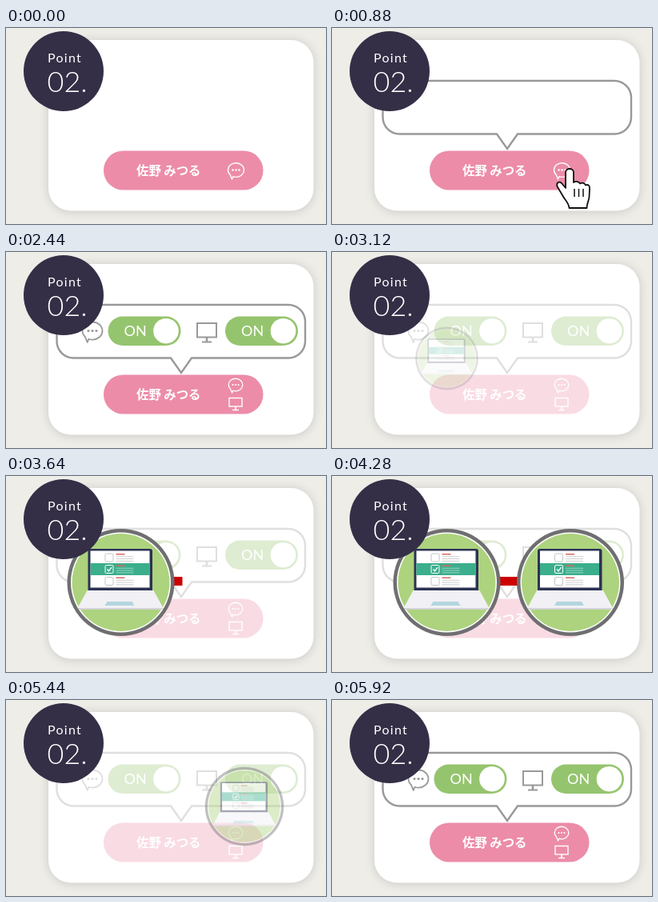
Write an HTML page with a canvas that moves like this. It is 400 px wide and 245 px high and loops after 6000 ms.

```html
<!DOCTYPE html>
<html lang="ja">
<head>
<meta charset="utf-8">
<style>
html, body { margin: 0; width: 100%; height: 100%; overflow: hidden; background: #eeede8; }
canvas { display: block; }
</style>
</head>
<body>
<canvas id="stage" width="400" height="245"></canvas>
<script>
const LOOP = 6000, STEP = 40;
const GRAY = '#999999', GREEN = '#95c46e', PINK = '#ec8ca8', NAVY = '#2c3354';
const stage = document.getElementById('stage');
const screenCtx = stage.getContext('2d');
const layer = document.createElement('canvas');
layer.width = 400;
layer.height = 245;
const layerCtx = layer.getContext('2d');
let ctx = screenCtx;

// Progress of a move whose first and last visible steps are given.
const progress = (t, first, last) =>
  Math.min(1, Math.max(0, (t - first + STEP) / (last - first + STEP)));
const mix = (a, b, p) => a + (b - a) * p;

function rect(x, y, w, h, color) {
  ctx.fillStyle = color;
  ctx.fillRect(x, y, w, h);
}

function pill(x, y, w, h, r, color) {
  ctx.beginPath();
  ctx.roundRect(x, y, w, h, r);
  ctx.fillStyle = color;
  ctx.fill();
}

function disc(x, y, r, color) {
  ctx.beginPath();
  ctx.arc(x, y, r, 0, Math.PI * 2);
  ctx.fillStyle = color;
  ctx.fill();
}

function poly(points, color) {
  ctx.beginPath();
  points.forEach(([x, y]) => ctx.lineTo(x, y));
  ctx.closePath();
  ctx.fillStyle = color;
  ctx.fill();
}

function line(points, color, width) {
  ctx.beginPath();
  points.forEach(([x, y]) => ctx.lineTo(x, y));
  ctx.strokeStyle = color;
  ctx.lineWidth = width;
  ctx.stroke();
}

function label(text, x, y, font, spacing = 0) {
  ctx.font = font;
  ctx.letterSpacing = spacing + 'px';
  ctx.fillStyle = '#fff';
  ctx.fillText(text, x, y);
}

// Draws a group as one picture, scaled about a point and faded as a whole.
function group(alpha, scale, cx, cy, draw) {
  if (alpha <= 0) return;
  layerCtx.clearRect(0, 0, 400, 245);
  layerCtx.save();
  layerCtx.translate(cx, cy);
  layerCtx.scale(scale, scale);
  layerCtx.translate(-cx, -cy);
  ctx = layerCtx;
  draw();
  layerCtx.restore();
  ctx = screenCtx;
  ctx.globalAlpha = Math.min(1, alpha);
  ctx.drawImage(layer, 0, 0);
  ctx.globalAlpha = 1;
}

function popIn(p, from, peak) {
  return p < 0.7 ? mix(from, peak, p / 0.7) : mix(peak, 1, (p - 0.7) / 0.3);
}

function popOut(p) {
  return p < 0.2 ? mix(1, 1.06, p / 0.2) : mix(1.06, 0.36, (p - 0.2) / 0.8);
}

function card() {
  rect(0, 0, 400, 245, '#eeede8');
  ctx.save();
  ctx.shadowColor = 'rgba(90, 85, 75, 0.24)';
  ctx.shadowBlur = 12;
  ctx.shadowOffsetY = 1;
  pill(53, 15, 331.5, 213.5, 28, '#fff');
  ctx.restore();
}

function badge() {
  disc(72, 54, 50, '#342f46');
  label('Point', 52, 42.5, '16px Lato, sans-serif', 1.3);
  label('02.', 51.5, 80, '300 36px Lato, sans-serif');
}

function chatIcon(x, y, s, color, width) {
  ctx.save();
  ctx.translate(x, y);
  ctx.scale(s, s);
  ctx.beginPath();
  ctx.ellipse(0, 0, 10, 8.8, 0, Math.PI * 0.76, Math.PI * 2.62);
  ctx.lineTo(-5, 11.5);
  ctx.closePath();
  ctx.strokeStyle = color;
  ctx.lineWidth = width / s;
  ctx.lineJoin = 'round';
  ctx.stroke();
  for (const dx of [-4, 0, 4]) disc(dx, 0, 1.25, color);
  ctx.restore();
}

function monitorIcon(x, y, w, h, foot, color, width) {
  ctx.strokeStyle = color;
  ctx.lineWidth = width;
  ctx.strokeRect(x - w / 2, y, w, h);
  line([[x, y + h], [x, y + h + foot]], color, width * 1.3);
  line([[x - w / 4, y + h + foot], [x + w / 4, y + h + foot]], color, width);
}

function nameButton(sharing) {
  pill(122, 153.5, 199.5, 49, 24.5, PINK);
  label('佐野 みつる', 163, 184, 'bold 15.4px "Noto Sans CJK JP", "Noto Sans CJK", sans-serif');
  if (sharing) {
    chatIcon(287, 166, 0.88, '#fff', 1.3);
    monitorIcon(287, 182.5, 16, 10.5, 4.5, '#fff', 1.4);
  } else {
    chatIcon(287.5, 177.5, 1, '#fff', 1.4);
  }
}

function bubble() {
  ctx.beginPath();
  ctx.moveTo(206, 132.5);
  ctx.lineTo(84, 132.5);
  ctx.arcTo(63.5, 132.5, 63.5, 112, 21);
  ctx.arcTo(63.5, 66, 84, 66, 21);
  ctx.arcTo(374, 66, 374, 87, 21);
  ctx.arcTo(374, 132.5, 353, 132.5, 21);
  ctx.lineTo(232, 132.5);
  ctx.lineTo(219, 151);
  ctx.closePath();
  ctx.fillStyle = '#fff';
  ctx.fill();
  ctx.strokeStyle = GRAY;
  ctx.lineWidth = 2.4;
  ctx.stroke();
}

function toggle(x, on) {
  pill(x, 80.5, 91, 36.5, 18.25, on ? GREEN : '#a9a9a9');
  disc(x + (on ? 72.5 : 18.5), 98.7, 15.8, '#fff');
  label(on ? 'ON' : 'OFF', x + (on ? 20 : 44), 105, '18px Lato, sans-serif');
}

function controls(sharing) {
  chatIcon(108, 98.5, 1.25, GRAY, 1.8);
  toggle(127.5, true);
  monitorIcon(251, 89, 24, 17.5, 6, GRAY, 2);
  toggle(274, sharing);
}

function hand(x, y) {
  ctx.save();
  ctx.translate(x, y);
  const shape = new Path2D('M12 26V6.500C12 .5 22 .5 22 6.500V19C25 17 29 18 30 20.500' +
    'C33 18.500 36 20 37 22.500C40 21 42.500 23 42 27L41.500 37C41 43 38.500 45 38.500 51H16.500' +
    'C16 44 11 41 8 35L1.500 24C0 19 4.500 17 7.500 20.500L12 26Z');
  ctx.fillStyle = '#fff';
  ctx.fill(shape);
  ctx.strokeStyle = '#111';
  ctx.lineWidth = 1.8;
  ctx.lineJoin = 'round';
  ctx.stroke(shape);
  for (const dx of [23, 28.5, 34]) line([[dx, 27], [dx, 37]], '#111', 1.5);
  ctx.restore();
}

function listRow(y, picked) {
  if (picked) rect(-38, y - 7.5, 74, 15, '#3bae8c');
  ctx.beginPath();
  ctx.roundRect(-19.5, y - 5, 10, 10, 1.5);
  ctx.strokeStyle = picked ? '#fff' : '#c4c4c4';
  ctx.lineWidth = 1;
  ctx.stroke();
  if (picked) line([[-17, y], [-15, y + 2.3], [-11.5, y - 2.3]], '#fff', 1.4);
  rect(-6, y - 5, 11, 1.5, '#d9695f');
  [22, 22, 22].forEach((w, i) =>
    rect(-6, y - 1.7 + i * 2.8, w, 0.9, picked ? '#9fd8c5' : '#c8c8c8'));
}

function laptopDisc(cx, lit) {
  ctx.save();
  ctx.translate(cx, 133);
  disc(0, 0, 67, '#6f6e71');
  disc(0, 0, 62.5, '#fff');
  disc(0, 0, 61, '#add37e');
  pill(-41, -42, 80.5, 54, 3, NAVY);
  if (lit) {
    rect(-38, -39.5, 74, 46, '#fff');
    listRow(-31, false);
    listRow(-16.5, true);
    listRow(-1.5, false);
  }
  poly([[-42, 10], [41, 10], [53, 32], [-54, 32]], '#f1f0f4');
  poly([[-54, 32], [53, 32], [51, 34], [-52, 34]], '#d4d3da');
  poly([[-17, 24], [14, 24], [17, 29], [-20, 29]], '#b2d6df');
  ctx.restore();
}

function cursor(t) {
  if (t < 200 || t >= 2440) return;
  const enter = progress(t, 200, 440);
  const move = progress(t, 1520, 1920);
  const leave = progress(t, 2160, 2440);
  const x = mix(335, 280, enter) + 40 * move + 124 * move * (1 - move) + 17 * leave;
  const y = 174 - 87 * move + 81 * leave;
  group(enter * (1 - leave), 1, 0, 0, () => hand(x, y));
}

function poppingLaptop(t, cx, enterAt, leaveAt, leaveEnd, lit) {
  const enter = progress(t, enterAt, enterAt + 320);
  const leave = progress(t, leaveAt, leaveEnd);
  const scale = leave > 0 ? popOut(leave) : popIn(enter, 0.5, 1.06);
  const alpha = Math.min(1, enter / 0.55) * (1 - leave);
  group(alpha, scale, cx, 133, () => laptopDisc(cx, lit));
}

function render(t) {
  const sharing = t >= 2040;
  card();
  nameButton(sharing);

  const open = progress(t, 600, 880);
  group(open / 0.55, popIn(open, 0.5, 1.03), 218.5, 108, bubble);
  group(progress(t, 1040, 1200), 1, 0, 0, () => controls(sharing));
  cursor(t);

  const veil = 0.69 * (progress(t, 2640, 2960) - progress(t, 5720, 5920));
  if (veil > 0) rect(60, 62, 318, 142, `rgba(255, 255, 255, ${veil})`);

  if (t < 5320) rect(209, 126, 23 * progress(t, 3600, 3720), 11, '#cc0000');
  poppingLaptop(t, 143.5, 3120, 5080, 5280, true);
  poppingLaptop(t, 298, 3800, 5320, 5560, t >= 4280);
  badge();
}

const start = performance.now();
function tick() {
  const t = (performance.now() - start) % LOOP;
  render(Math.floor(t / STEP) * STEP);
  requestAnimationFrame(tick);
}
tick();
</script>
</body>
</html>
```
